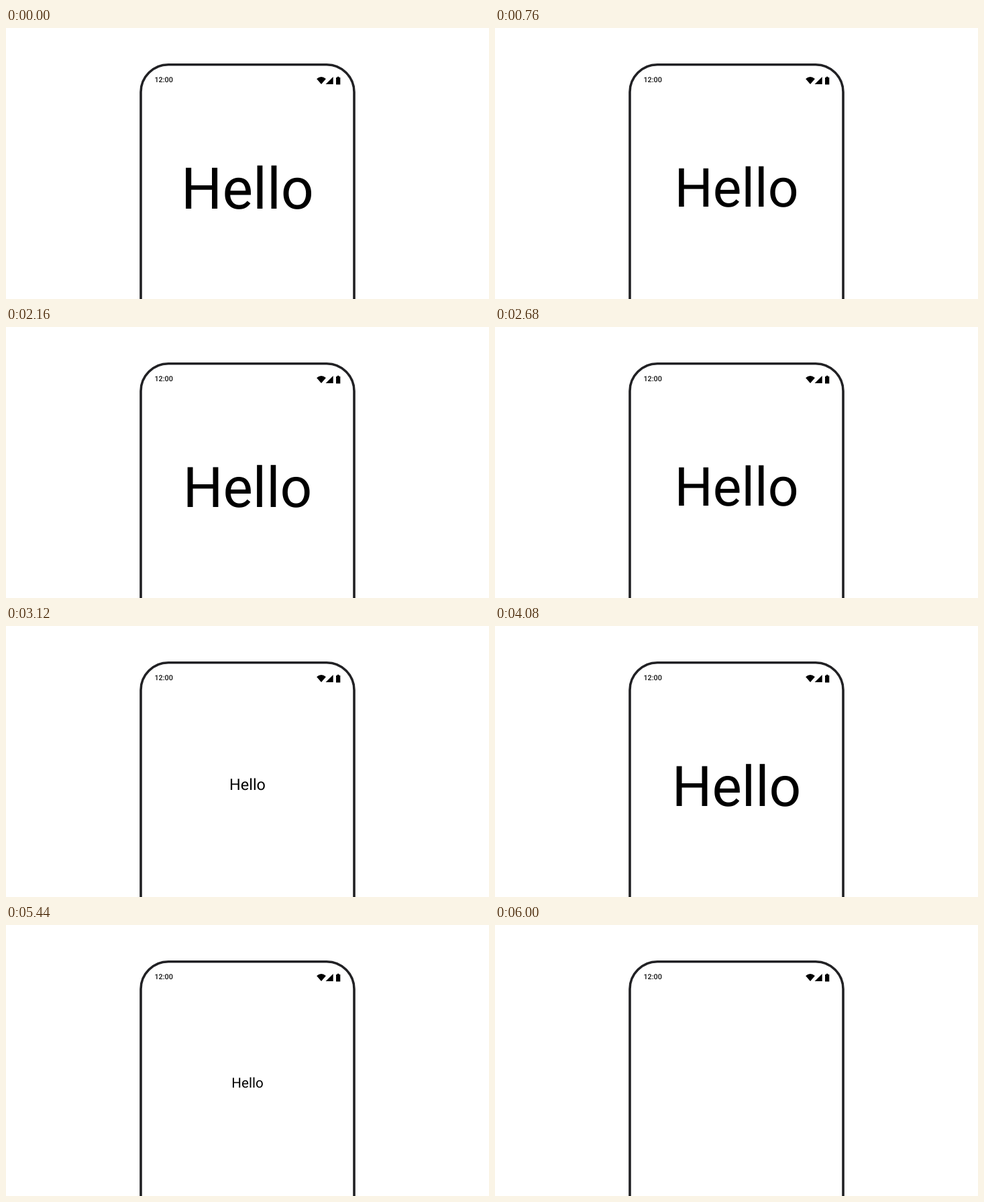
These frames come from a looping animation (720 by 405 pixels, 6.48 s). An HTML page:

```html
<!DOCTYPE html>
<html lang="en">
<head>
<meta charset="utf-8">
<title>Hello</title>
<style>
  html, body { margin: 0; width: 100%; height: 100%; overflow: hidden; background: #fff; }
  svg { display: block; width: 720px; height: 405px; }
  text { font-family: Roboto, sans-serif; text-rendering: geometricPrecision; }
</style>
</head>
<body>
<svg viewBox="0 0 720 405">
  <rect x="201" y="54.8" width="318" height="420" rx="41" fill="#fff" stroke="#212124" stroke-width="3.6"/>
  <text x="221.4" y="81" font-size="10.8" font-weight="500" fill="#111">12:00</text>
  <!-- Wi-Fi, signal, battery -->
  <path d="M470 84 L463.1 75.9 Q470 70.1 476.9 75.9 Z"/>
  <path d="M476.6 84 H487.7 V72.9 Z"/>
  <path d="M492 84.4 V74 H493.7 V72.8 H496.6 V74 H498.3 V84.4 Z"/>
  <text id="hello" y="34.4" font-size="86" text-anchor="middle">Hello</text>
</svg>
<script>
const LOOP = 6480, STEP = 40;
const HOLD = 520, GONE = 6000;   // text rests before HOLD, disappears at GONE
const PEAK = 450, HALF = 960;    // first full-size moment, duration of one sweep
const hello = document.getElementById('hello');

// cubic-bezier(.4, 0, .2, 1)
function ease(x) {
  let lo = 0, hi = 1;
  for (let i = 0; i < 24; i++) {
    const s = (lo + hi) / 2, r = 1 - s;
    if (1.2 * r * r * s + 0.6 * r * s * s + s * s * s < x) lo = s;
    else hi = s;
  }
  return lo * lo * (3 - 2 * lo);
}

// Swings between 1/8 and full size, mirrored in time at each end
function scaleAt(t) {
  if (t < HOLD) return 1;
  const phase = ((t - PEAK) / HALF) % 2;
  return (1 + 7 * ease(Math.abs(1 - phase))) / 8;
}

function draw() {
  const now = performance.now() % LOOP;
  const t = Math.floor(now / STEP) * STEP;
  hello.setAttribute('visibility', t < GONE ? 'visible' : 'hidden');
  hello.setAttribute('transform', `translate(360 235.2) scale(${scaleAt(t)})`);
  requestAnimationFrame(draw);
}
draw();
</script>
</body>
</html>
```
